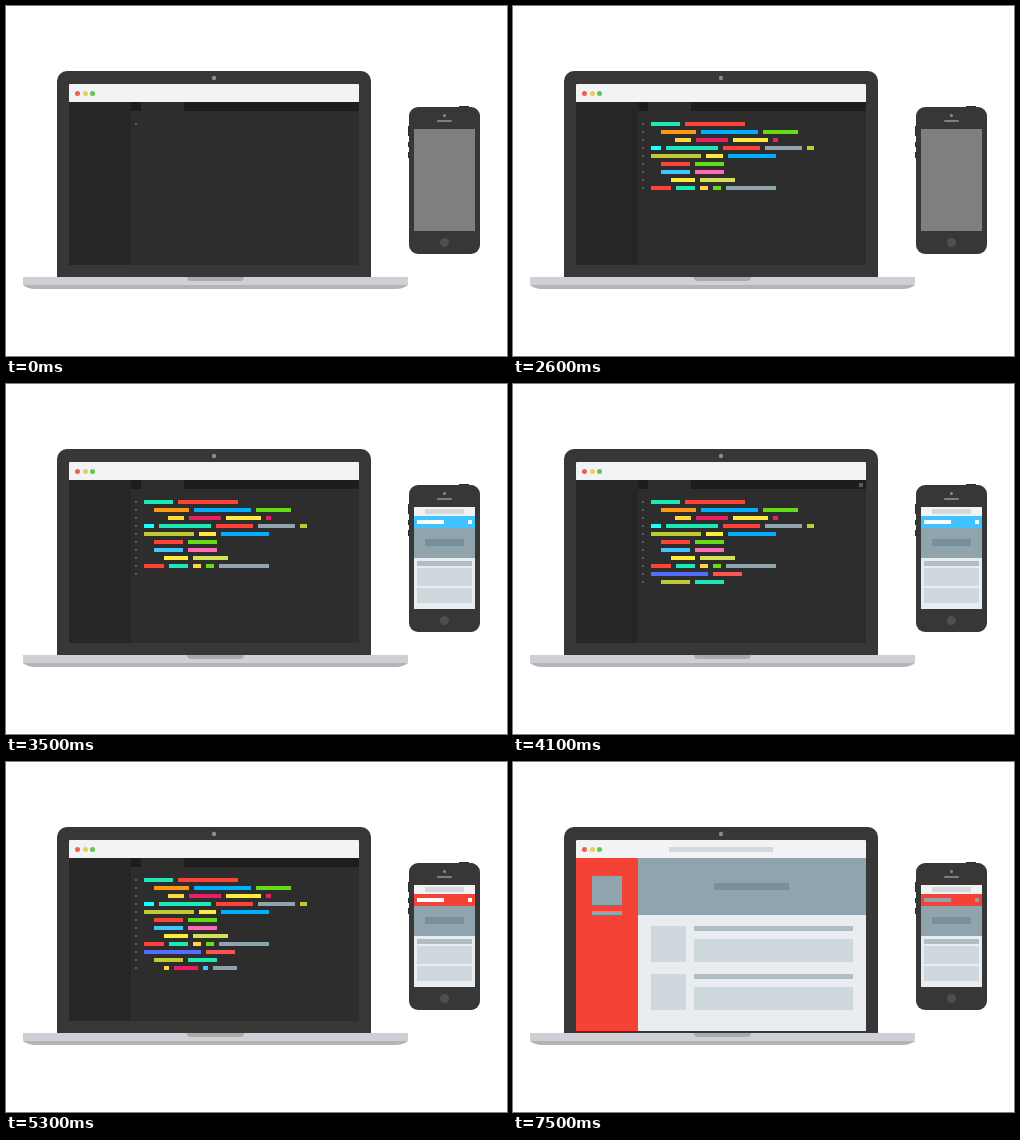
Animation, 501 px wide and 350 px high, one loop 8 s. Source, as an HTML page:

```html
<!DOCTYPE html>
<html lang="en">
<head>
<meta charset="utf-8">
<title>Code to responsive site</title>
<style>
  html, body { margin: 0; width: 100%; height: 100%; overflow: hidden; background: #fff; }
  svg { display: block; width: 501px; height: 350px; }
</style>
</head>
<body>
<svg id="stage" viewBox="0 0 501 350"></svg>
<script>
const LOOP = 8000, STEP = 100;
const BODY = '#373737', BLUE = '#40c4ff', RED = '#f44336';
const HERO = '#90a4ae', HERO_BAR = '#78909c', TITLE = '#b0bec5', BLOCK = '#cfd8dc', PAGE = '#e9edf0';

const COLORS = {
  teal: '#1de9b6', red: '#ff4136', orange: '#ff9810', blue: '#00b0ff', green: '#64dd17',
  amber: '#ffd740', pink: '#e91e63', yellow: '#ffeb3b', cyan: '#18ffff', grey: '#90a4ae',
  olive: '#c0ca33', sky: '#40c4ff', rose: '#ff69b4', lime: '#d4e157', indigo: '#536dfe',
  coral: '#ff5252', slate: '#78909c'
};

// Each line: indent, then colour and width of every word.
const LINES = [
  '0 teal 29 red 60',
  '10 orange 35 blue 57 green 35',
  '24 amber 16 pink 32 yellow 35 pink 5',
  '0 cyan 10 teal 52 red 37 grey 37 olive 7',
  '0 olive 50 yellow 17 blue 48',
  '10 red 29 green 29',
  '10 sky 29 rose 29',
  '20 yellow 24 lime 35',
  '0 red 20 teal 19 amber 8 green 8 grey 50',
  '0 indigo 57 coral 29',
  '10 olive 29 teal 29',
  '20 amber 5 pink 24 sky 5 grey 24 orange 5 red 5',
  '0 coral 20 amber 44',
  '10 olive 30 sky 12',
  '0 orange 32 green 20 pink 7 slate 68',
  '10 sky 12 pink 20',
  '0 red 20 amber 24'
];

// Time and number of typed marks (line dots and words).
const TYPING = [[0, 1], [900, 14], [1600, 22], [1800, 24], [2600, 37], [3500, 38],
  [4000, 43], [4900, 44], [5700, 52], [6600, 62], [7100, 67]];

// Site, page start, phone start, page end, saved mark start.
const REVEALS = [
  { laptop: 2900, phone: 3000, end: 3500, saved: 2700, accent: BLUE, detail: '#fff' },
  { laptop: 4300, phone: 4400, end: 4900, saved: 4100, accent: RED, detail: '#fff' },
  { laptop: 7400, phone: 7500, end: 8000, saved: 7200, accent: RED, detail: HERO }
];

const stage = document.getElementById('stage');

function add(parent, tag, attrs = {}) {
  const node = document.createElementNS('http://www.w3.org/2000/svg', tag);
  for (const key in attrs) node.setAttribute(key, attrs[key]);
  return parent.appendChild(node);
}
const group = (parent = stage) => add(parent, 'g');
const path = (parent, d, fill) => add(parent, 'path', { d, fill });
const dot = (parent, cx, cy, r, fill) => add(parent, 'circle', { cx, cy, r, fill });
const box = (parent, x1, y1, x2, y2, fill, rx = 0) =>
  add(parent, 'rect', { x: x1, y: y1, width: x2 - x1, height: y2 - y1, fill, rx });
const show = (node, on) => node.setAttribute('visibility', on ? 'visible' : 'hidden');

function drawLaptop() {
  path(stage, 'M51 271V75a10 10 0 0 1 10-10H355a10 10 0 0 1 10 10V271Z', BODY);
  dot(stage, 208, 72, 2.2, '#8c8c8c');
  path(stage, 'M17 279H402Q397 283 390 283H29Q22 283 17 279Z', '#b2b4b7');
  box(stage, 17, 271, 402, 279, '#cfd0d5');
  path(stage, 'M181 271H238Q238 275 234 275H185Q181 275 181 271Z', '#a9abae');
  path(stage, 'M63 96V79a1 1 0 0 1 1-1H352a1 1 0 0 1 1 1V96Z', '#f2f3f4');
  dot(stage, 71.5, 87.5, 2.5, '#ee5f50');
  dot(stage, 79.5, 87.5, 2.5, '#e8d057');
  dot(stage, 86.5, 87.5, 2.5, '#62c554');
}

function drawEditor() {
  const editor = group();
  box(editor, 63, 96, 353, 259, '#2d2d2d');
  box(editor, 63, 96, 125, 259, '#262626');
  box(editor, 125, 96, 135, 105, '#1d1d1d');
  box(editor, 178, 96, 353, 105, '#1d1d1d');
  return editor;
}

function drawCode(editor) {
  const marks = [];
  LINES.forEach((line, row) => {
    const [indent, ...words] = line.split(' ');
    const y = 116 + row * 8;
    let x = 138 + Number(indent);
    marks.push(box(editor, 129, y + 1, 131, y + 3, '#5c5c5c'));
    for (let i = 0; i < words.length; i += 2) {
      const end = x + Number(words[i + 1]);
      marks.push(box(editor, x, y, end, y + 4, COLORS[words[i]]));
      x = end + 5;
    }
  });
  return marks;
}

function drawPhone() {
  box(stage, 453, 100, 463, 102, '#2b2b2b');
  for (const [top, bottom] of [[120, 130], [136, 141], [146, 152]])
    box(stage, 402, top, 404, bottom, '#2b2b2b');
  box(stage, 403, 101, 474, 248, BODY, 9);
  dot(stage, 438.5, 109.5, 1.5, '#8c8c8c');
  box(stage, 431, 114, 446, 116, '#7f7f7f', 1);
  dot(stage, 438.5, 236.5, 4.5, '#4f4f4f');
  box(stage, 408, 123, 469, 225, '#7f7f7f');
}

function drawLaptopSite({ accent, detail }) {
  const site = group();
  box(site, 156, 85, 260, 90, '#d3d8de');
  box(site, 63, 96, 353, 269, PAGE);
  box(site, 63, 96, 125, 269, accent);
  box(site, 79, 114, 109, 143, detail);
  box(site, 79, 149, 109, 153, detail);
  box(site, 125, 96, 353, 153, HERO);
  box(site, 201, 121, 276, 128, HERO_BAR);
  for (const y of [164, 212]) {
    box(site, 138, y, 173, y + 36, BLOCK);
    box(site, 181, y, 340, y + 5, TITLE);
    box(site, 181, y + 13, 340, y + 36, BLOCK);
  }
  return site;
}

function drawPhoneSite({ accent, detail }) {
  const site = group();
  box(site, 408, 123, 469, 225, PAGE);
  box(site, 408, 123, 469, 132, '#f2f3f4');
  box(site, 419, 125, 458, 130, '#d3d8de');
  box(site, 408, 132, 469, 144, accent);
  box(site, 411, 136, 438, 140, detail);
  box(site, 462, 136, 466, 140, detail);
  box(site, 408, 144, 469, 174, HERO);
  box(site, 419, 155, 458, 162, HERO_BAR);
  box(site, 411, 177, 466, 182, TITLE);
  box(site, 411, 184, 466, 202, BLOCK);
  box(site, 411, 204, 466, 219, BLOCK);
  return site;
}

function typedCount(time) {
  const next = TYPING.findIndex(([at]) => at > time);
  if (next < 0) return TYPING[TYPING.length - 1][1];
  const [t0, n0] = TYPING[next - 1], [t1, n1] = TYPING[next];
  return Math.floor(n0 + (n1 - n0) * (time - t0) / (t1 - t0) + 1e-6);
}

drawLaptop();
const editor = drawEditor();
const marks = drawCode(editor);
const saved = box(editor, 346, 99, 350, 103, '#5c5c5c');
drawPhone();
const sites = REVEALS.map(reveal => ({
  ...reveal, page: drawLaptopSite(reveal), mobile: drawPhoneSite(reveal)
}));

function render(elapsed) {
  const time = Math.floor(elapsed % LOOP / STEP) * STEP;
  const count = typedCount(time);
  marks.forEach((mark, i) => show(mark, i < count));
  let isSite = false, isSaved = false;
  sites.forEach((site, i) => {
    const onLaptop = time >= site.laptop && time < site.end;
    const nextPhone = i + 1 < sites.length ? sites[i + 1].phone : LOOP;
    show(site.page, onLaptop);
    show(site.mobile, time >= site.phone && time < nextPhone);
    isSite = isSite || onLaptop;
    isSaved = isSaved || (time >= site.saved && time < site.laptop);
  });
  show(saved, isSaved);
  editor.setAttribute('display', isSite ? 'none' : 'inline');
}

const start = performance.now();
function tick() {
  render(performance.now() - start);
  requestAnimationFrame(tick);
}
tick();
</script>
</body>
</html>
```
